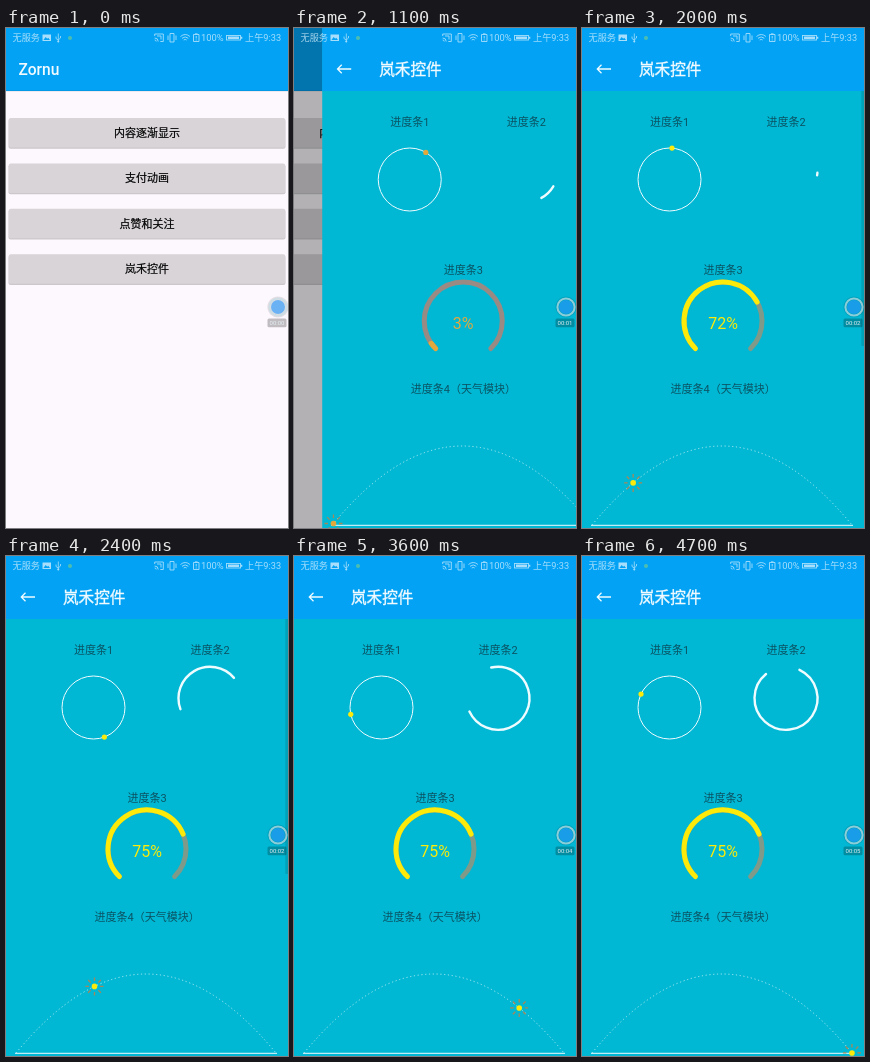
An HTML page that plays this animation: 282 by 500 pixels, repeating every 4800 ms.

```html
<!DOCTYPE html>
<html lang="zh">
<head>
<meta charset="utf-8">
<style>
  html, body { margin: 0; width: 100%; height: 100%; overflow: hidden; background: #fcf8fc; }
  svg { display: block; width: 100vw; height: 100vh; }
  text { font-family: Roboto, "Noto Sans CJK SC", "Noto Sans CJK", sans-serif; }
  .mid { text-anchor: middle; }
  .label { font-size: 11px; fill: #0b5363; }
  .title { font-size: 15.6px; font-weight: 500; fill: #f0faff; }
  .heavy { stroke: #f0faff; stroke-width: .35px; }
  .button { font-size: 11px; stroke: #000; stroke-width: .2px; }
  .centred { font-family: "Noto Sans CJK TC", "Noto Sans CJK", sans-serif; }
  .line { fill: none; stroke: #eefbff; }
</style>
</head>
<body>
<svg viewBox="0 0 282 500">
  <g id="menu">
    <rect id="menuBack" width="282" height="500"/>
    <rect width="282" height="63" fill="#03a2f4"/>
    <rect y="62.5" width="282" height="1" fill="#000" opacity=".12"/>
    <text class="title" x="12.5" y="47">Zornu</text>
    <g id="buttons"></g>
  </g>
  <rect id="scrim" width="282" height="500"/>

  <g id="page">
    <rect width="282" height="500" fill="#00b8d4"/>
    <rect width="282" height="63" fill="#03a2f4"/>
    <path class="line" stroke-width="1.3" d="M29 41H15.5M19.5 36.8L15.3 41L19.5 45.2"/>
    <text class="title heavy" x="57" y="46.8">岚禾控件</text>
    <text class="label mid" x="87.5" y="98">进度条1</text>
    <text class="label mid" x="204" y="98">进度条2</text>
    <text class="label mid" x="141" y="245.5">进度条3</text>
    <text class="label" x="88.5" y="364.5">进度条4<tspan class="centred" lang="zh-Hant">（</tspan>天气模块<tspan class="centred" lang="zh-Hant">）</tspan></text>

    <circle class="line" cx="87.5" cy="151.5" r="31.5" stroke-width="1"/>
    <circle id="orbiter" r="2.6"/>
    <path id="spinner" class="line" stroke-width="2.4" stroke-linecap="round"/>

    <g fill="none" stroke-width="5" stroke-linecap="round">
      <path id="track"/>
      <path id="gauge"/>
    </g>
    <text id="percent" class="mid" x="141" y="301" font-size="16"></text>

    <path id="sky" class="line" d="M10 497Q140 339 270 497" stroke-width=".9" stroke-dasharray="1.2 2.6" opacity=".75"/>
    <path class="line" d="M9 497.3H271" stroke-width="1"/>
    <g id="sun">
      <path id="rays" stroke="#a5875a" stroke-width="1.3"/>
      <circle id="sunCore" r="2.8"/>
    </g>
    <rect id="scrollbar" x="279.3" y="63" width="2.7" height="255"/>
  </g>

  <g fill="#d4effd" font-size="9" opacity=".78">
    <text x="6.5" y="13.2" font-size="9.2">无服务</text>
    <path fill-rule="evenodd" d="M36.5 6.5h8.5v6.5h-8.5zM37.5 12l2.2-3 1.5 1.8 1-1 1.8 2.2z"/>
    <path d="M52.3 5.5v8.5M50 8.5v2l2.3 1.5 2.2-2v-2" fill="none" stroke="#d4effd" stroke-width=".8"/>
    <circle cx="52.3" cy="13.5" r="1"/>
    <circle cx="64" cy="10" r="2" fill="#62c79a"/>
    <g fill="none" stroke="#d4effd" stroke-width=".9">
      <path d="M148.7 8V6h8.6v7.5h-3M148.7 10a3.5 3.5 0 0 1 3.5 3.5M148.7 12a1.5 1.5 0 0 1 1.5 1.5M151 8h4v3.5"/>
      <path d="M164 5.5h4v8.5h-4zM162 7.5v4.5M170 7.5v4.5"/>
      <path d="M174.5 8.5q4.7-4 9.4 0M176 10.3q3.2-2.7 6.4 0M177.7 12q1.5-1.2 3 0"/>
      <path d="M187.5 6.5h5.5v7h-5.5zM190.2 8v2.5M190.2 11.5v1M189 5.8h2.5"/>
      <rect x="220.5" y="7.5" width="14" height="4.5"/>
    </g>
    <path d="M222 8.5h11v2.5h-11zM235 8.7h1.3v2h-1.3z"/>
    <text x="195" y="13.2" font-size="9.4">100%</text>
    <text x="239" y="13.2" font-size="9.2">上午9:33</text>
  </g>

  <g id="recorder">
    <circle cx="272" cy="279" r="10.6" fill="#000" opacity=".1"/>
    <circle cx="272" cy="279" r="8.6" fill="none" stroke="#c4dce4" stroke-width="2" opacity=".72"/>
    <circle cx="272" cy="279" r="7" fill="#279aff" opacity=".64"/>
    <rect x="261.5" y="290.5" width="19" height="8.8" rx="1.5" opacity=".24"/>
    <text id="clock" class="mid" x="271" y="297.2" font-size="6" fill="#e4f0f4"></text>
  </g>
</svg>

<script>
const LOOP = 4800, STEP = 100, LAUNCH = 908;
const $ = id => document.getElementById(id);
const set = (id, attrs) => {
  for (const key in attrs) $(id).setAttribute(key, attrs[key]);
};
const clamp = v => Math.min(1, Math.max(0, v));
const easeInOut = p => (1 - Math.cos(Math.PI * p)) / 2;

// Angles in degrees, clockwise from three o'clock.
function polar(cx, cy, r, deg) {
  const a = deg * Math.PI / 180;
  return [cx + r * Math.cos(a), cy + r * Math.sin(a)];
}
function arc(cx, cy, r, start, sweep) {
  const large = sweep > 180 ? 1 : 0;
  return `M${polar(cx, cy, r, start)}A${r} ${r} 0 ${large} 1 ${polar(cx, cy, r, start + sweep)}`;
}

$('buttons').innerHTML = ['内容逐渐显示', '支付动画', '点赞和关注', '岚禾控件'].map((name, i) => {
  const y = 90 + 45.4 * i;
  return `<rect x="2.5" y="${y + .8}" width="277" height="30" rx="2" opacity=".2"/>
    <rect x="3" y="${y}" width="276" height="29.5" rx="1.5" fill="#d8d4d8"/>
    <text class="mid button" x="141" y="${y + 19}">${name}</text>`;
}).join('');

set('track', { d: arc(141, 293, 39, 135, 270) });
set('rays', {
  d: Array.from({ length: 8 }, (_, i) =>
    `M${polar(0, 0, 5.5, i * 45)}L${polar(0, 0, 9, i * 45)}`).join('')
});
const skyLength = $('sky').getTotalLength();

function draw(t) {
  const slide = 1 - (1 - clamp((t - 925) / 400)) ** 4;
  set('menuBack', { fill: t < 900 ? '#fdf8fd' : '#faf8fc' });
  set('menu', { transform: `translate(${-92 * slide} 0)` });
  set('scrim', { opacity: .32 * slide });
  set('page', {
    transform: `translate(${282 * (1 - slide)} 0)`,
    visibility: slide > 0 ? 'visible' : 'hidden'
  });

  const since = Math.max(0, t - LAUNCH);
  const accent = t < 1200 ? '#e3a83c' : '#fcea0a';
  const turn = 360 * easeInOut(since / 1019 % 1);
  const [ox, oy] = polar(87.5, 151.5, 31.5, turn - 90);
  set('orbiter', { cx: ox, cy: oy, fill: accent });
  set('spinner', { d: arc(204, 142.3, 31.5, turn, turn) });

  const value = 75 * easeInOut(clamp((t - 925) / 1215));
  set('track', { stroke: t < 1200 ? '#998a84' : t < 1600 ? '#8b8c8a' : '#7f9a89' });
  set('gauge', { d: arc(141, 293, 39, 135, value * 2.7), stroke: accent });
  set('percent', { fill: accent });
  $('percent').textContent = Math.floor(value) + '%';

  const spot = $('sky').getPointAtLength(skyLength * easeInOut(clamp(since / 3830)));
  set('sun', { transform: `translate(${spot.x} ${spot.y})` });
  set('sunCore', { fill: accent });
  set('scrollbar', { opacity: t < 1600 ? .35 : t < 2600 ? .12 : 0 });

  const seconds = Math.max(0, Math.floor((t - 100) / 870));
  $('clock').textContent = '00:0' + seconds;
}

const begin = performance.now();
function tick() {
  const t = (performance.now() - begin) % LOOP;
  draw(Math.floor(t / STEP) * STEP);
  requestAnimationFrame(tick);
}
tick();
</script>
</body>
</html>
```
